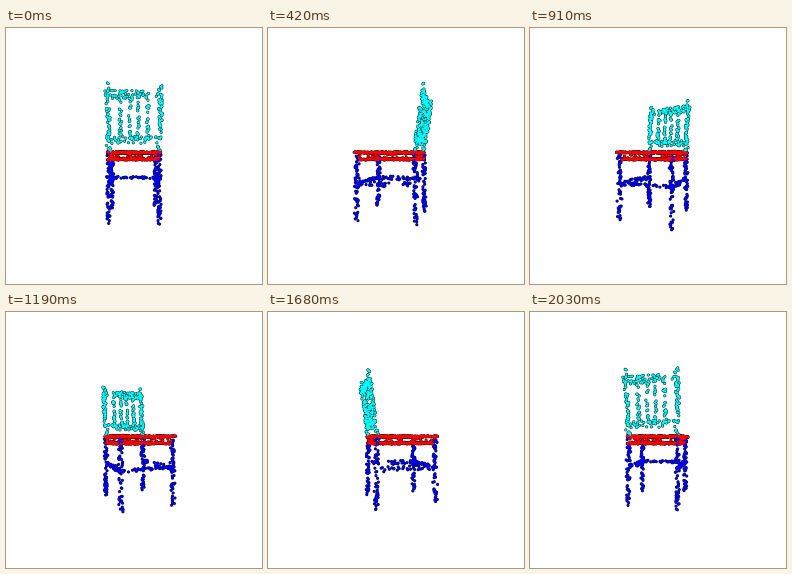
Animation of 256 by 256 pixels, one loop 2100 ms. Source, as a matplotlib script:

```python
import numpy as np
import matplotlib.pyplot as plt
from matplotlib.animation import FuncAnimation

SIZE, DPI = 256, 100
FRAMES, INTERVAL = 30, 70
MID = 128       # screen centre, also the horizon
CAMERA = 190    # distance from the turning axis
CYAN, RED, BLUE = (0, 1, 1), (1, 0, 0), (0, 0, 1)

rng = np.random.default_rng(7)
cloud, tints = [], []


def add(pts, color):
    cloud.append(pts)
    tints.append(np.tile(color, (len(pts), 1)))


def bar(a, b, n, color, spread=(1, 1, 1), bulge=0):
    """Scatter n points around the segment from a to b."""
    t = rng.random((n, 1))
    pts = np.array(a) + t * (np.array(b) - np.array(a))
    pts[:, 0] += bulge * np.sin(np.pi * t[:, 0])
    add(pts + rng.uniform(-1, 1, (n, 3)) * spread, color)


def slab(y, front, back, zf, zb, n, rim):
    """Trapezoid of the seat: n points inside, rim points on its outline."""
    t, u = rng.random(n), rng.uniform(-1, 1, n)
    half = front + t * (back - front)
    pts = np.column_stack([u * half, np.full(n, y), zf + t * (zb - zf)])
    pts[:, 1] += rng.uniform(-.4, .4, n)
    add(pts, RED)
    corners = [(-front, y, zf), (front, y, zf), (back, y, zb), (-back, y, zb)]
    for a, b in zip(corners, corners[1:] + corners[:1]):
        bar(a, b, rim // 4, RED, (.3, .4, .3))


def back_z(y):
    return 24 + 8 * (y / 61) ** 1.3


# backrest
for side in (-1, 1):
    bar((side * 22, 4, back_z(4)), (side * 22.5, 61, back_z(61)), 58, CYAN, (1.8, .5, 1.5))
    bar((side * 12, 14, back_z(14)), (side * 11.5, 52, back_z(52)), 24, CYAN, (1.2, 1, 1))
    bar((side * 2, 14, back_z(14)), (side * 2, 50, back_z(50)), 20, CYAN, (.8, 1, 1), side * 2)
bar((-20, 52, back_z(52)), (20, 52, back_z(52)), 54, CYAN, (1, 3.5, 1.2))
bar((-20, 14, back_z(14)), (20, 14, back_z(14)), 42, CYAN, (1, 3, 1.2))

# seat
slab(3.4, 28, 23, -31, 25, 190, 180)
slab(-3.2, 24, 22.5, -28, 24.5, 150, 150)
for side in (-1, 1):
    bar((side * 25, 0, -29), (side * 22.5, 0, 24.5), 16, RED, (.5, 3, .5))
bar((-22, 0, 24.5), (22, 0, 24.5), 16, RED, (.5, 3, .5))
bar((-25, 0, -29), (25, 0, -29), 12, RED, (.5, 3, .5))

# legs and stretchers
for side in (-1, 1):
    bar((side * 25, 2, -29.5), (side * 25, -60, -30), 58, BLUE, (1.7, 1, 1.7))
    bar((side * 22, 3, 24), (side * 22, -60, 25), 58, BLUE, (1.7, 1, 1.7))
    bar((side * 24.5, -25, -28), (side * 22, -25, 22), 32, BLUE, (1, 2.2, 1))
bar((-23, -25, -29.5), (23, -25, -29.5), 34, BLUE, (1, 1.1, 1))

cloud, tints = np.vstack(cloud), np.vstack(tints)

fig = plt.figure(figsize=(SIZE / DPI, SIZE / DPI), dpi=DPI, facecolor="white")
ax = fig.add_axes([0, 0, 1, 1])
ax.set(xlim=(0, SIZE), ylim=(SIZE, 0))
ax.axis("off")


def dots(diameter, zorder):
    return ax.scatter(cloud[:, 0], cloud[:, 1], s=(diameter * 72 / DPI) ** 2,
                      linewidths=0, zorder=zorder)


rims, cores = dots(3.1, 1), dots(2.0, 2)


def draw(frame):
    angle = 2 * np.pi * frame / FRAMES
    c, s = np.cos(angle), np.sin(angle)
    x, y, z = cloud.T
    depth = z * c - x * s
    scale = CAMERA / (CAMERA - depth)
    order = np.argsort(depth)
    spots = np.column_stack([MID + (x * c + z * s) * scale, MID - y * scale])[order]
    for layer, shade in ((rims, .2), (cores, 1)):
        layer.set_offsets(spots)
        layer.set_facecolors(tints[order] * shade)
    return rims, cores


anim = FuncAnimation(fig, draw, frames=FRAMES, interval=INTERVAL, repeat=True, repeat_delay=0)
plt.show()
```
